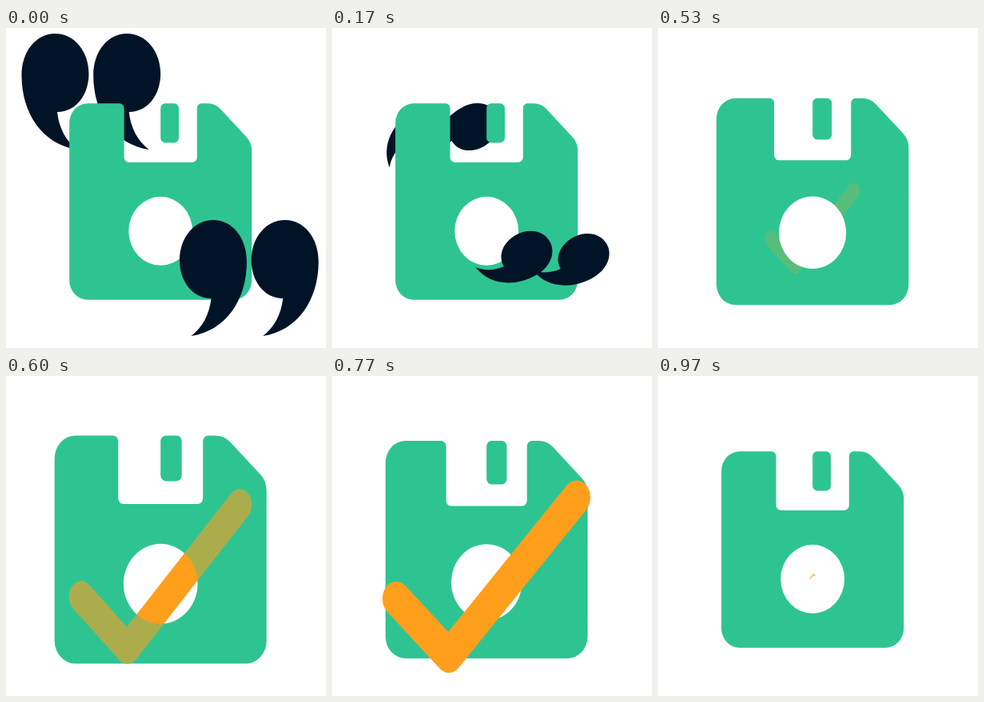
Recreate the animation shown at these times as an HTML page with a canvas. Size 400 by 400 pixels, loop 1010 ms.

```html
<!DOCTYPE html>
<html lang="en">
<head>
<meta charset="utf-8">
<title>Save</title>
<style>
html, body { margin: 0; width: 100%; height: 100%; overflow: hidden; background: #fff; }
canvas { display: block; width: 100%; height: 100%; }
</style>
</head>
<body>
<canvas id="stage" width="400" height="400"></canvas>
<script>
const ctx = document.getElementById('stage').getContext('2d');
const GREEN = '#2ec492', NAVY = '#011427', ORANGE = '#ff9f1c';
const LOOP = 1010, STEP = 33.34, LAST = 29;

const mix = (a, b, p) => a + (b - a) * p;
const ramp = (f, from, to) => Math.min(1, Math.max(0, (f - from) / (to - from)));

// Disk on a grid from -10 to 10; corners near the notch are tighter
function makeDisk() {
  const path = new Path2D();
  const corners = [
    [-10, -10], [-4, -10], [-4, -4], [4, -4], [4, -10],
    [6, -10], [10, -6], [10, 10], [-10, 10]
  ];
  path.moveTo(-10, 0);
  corners.forEach(([x, y], i) => {
    const [nx, ny] = corners[(i + 1) % corners.length];
    path.arcTo(x, y, nx, ny, Math.abs(x) === 4 ? 0.5 : 2);
  });
  path.closePath();
  path.moveTo(3.5, 3);
  path.arc(0, 3, 3.5, 0, 2 * Math.PI);
  path.roundRect(0, -10, 2, 4, 0.5);
  return path;
}

const disk = makeDisk();
const quote = new Path2D(`
  M0 -72.5 C24 -72.5 42 -50 42 -20.5 C42 27 16 66 -27.5 72.5
  C-13 61 -5 46 -2.5 25.5 C-26 25.5 -42 4 -42 -22.5 C-42 -50 -24 -72.5 0 -72.5 Z`);
const tick = new Path2D('M-146.5 29.1 L-61 103.2 L146.5 -102.8');

function at(x, y, sx, sy, paint) {
  ctx.save();
  ctx.translate(x, y);
  ctx.scale(sx, sy);
  paint();
  ctx.restore();
}

// Two marks side by side spin half a turn and shrink while moving from start to end
function drawPair(start, end, gap, mirror, f) {
  if (f >= 14) return;
  const p = f / 15;
  ctx.fillStyle = NAVY;
  for (const i of [0, 1]) {
    const x = mix(start.x + 89.7 * i, end.x + gap.x * i, p);
    const y = mix(start.y, end.y + gap.y * i, p);
    at(x, y, 1 - p, 1 - p, () => {
      ctx.rotate(Math.PI * p);
      ctx.scale(mirror, 1);
      ctx.fill(quote);
    });
  }
}

function drawDisk(up, down) {
  const s = 1 + 0.27 * (up - down);
  ctx.fillStyle = GREEN;
  at(193.2, 217, 11.4 * s, 12.27 * s, () => ctx.fill(disk, 'evenodd'));
}

function strokeTick(sx, sy) {
  ctx.strokeStyle = ORANGE;
  ctx.lineWidth = 45;
  ctx.lineCap = ctx.lineJoin = 'round';
  at(193, 250.5, sx, sy * 1.289, () => ctx.stroke(tick));
}

function drawTick(up, down, out) {
  if (up === 0) return;
  const size = 0.19 + 0.81 * up;
  const sx = size - 0.385 * down - 0.795 * out;
  const sy = size - 0.428 * down - 0.742 * out;
  ctx.save();
  // Fades over the disk, but is all or nothing outside it
  ctx.globalCompositeOperation = 'source-atop';
  ctx.globalAlpha = up;
  strokeTick(sx, sy);
  if (up > 0.5) {
    ctx.globalCompositeOperation = 'destination-over';
    ctx.globalAlpha = 1;
    strokeTick(sx, sy);
  }
  ctx.restore();
}

function draw() {
  const t = performance.now() % LOOP;
  const f = Math.min(LAST, Math.floor((t + 4) / STEP));
  const up = ramp(f, 15, 20), down = ramp(f, 20, 25), out = ramp(f, 25, 30);
  ctx.clearRect(0, 0, 400, 400);
  drawPair({ x: 61.5, y: 79.5 }, { x: 191, y: 244 }, { x: -3, y: -10 }, -1, f);
  drawDisk(up, down);
  drawPair({ x: 259, y: 312.5 }, { x: 173, y: 247.5 }, { x: 34, y: 9.5 }, 1, f);
  drawTick(up, down, out);
  requestAnimationFrame(draw);
}
draw();
</script>
</body>
</html>
```
